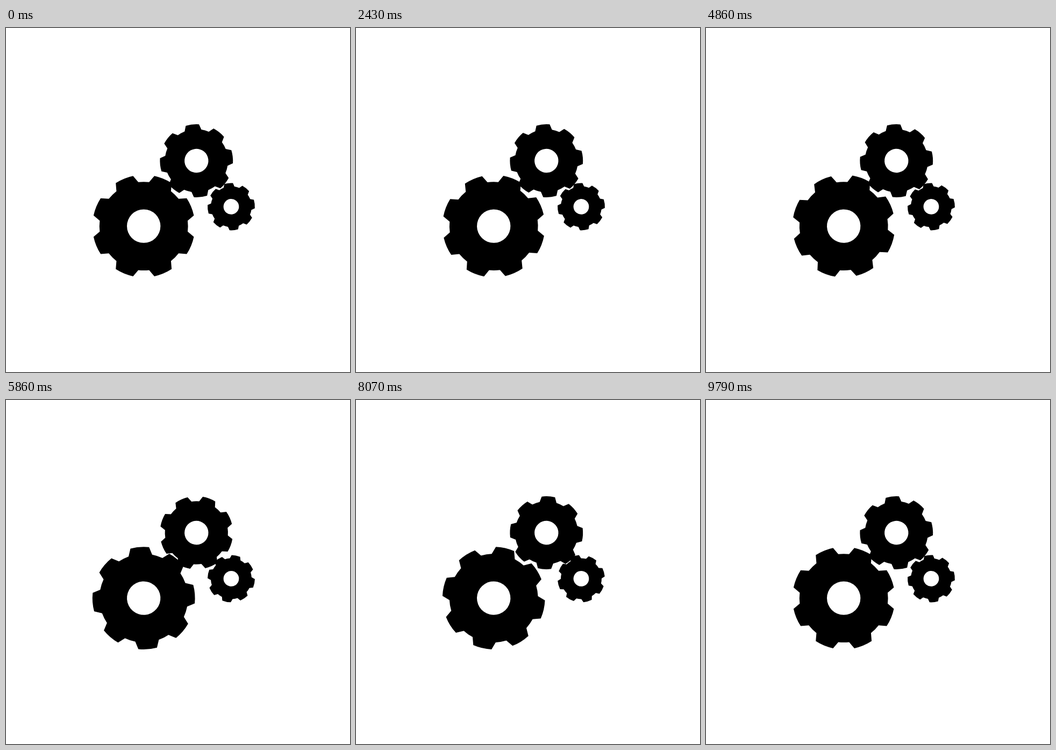
Animation, 640 px wide and 640 px high, one loop 9870 ms. Source, as an HTML page with a canvas:

```html
<!DOCTYPE html>
<html>
<head>
<meta charset="utf-8">
<title>Turning gears</title>
<style>
  html, body { margin: 0; height: 100%; overflow: hidden; background: #fff; }
  canvas { display: block; }
</style>
</head>
<body>
<canvas width="640" height="640"></canvas>
<script>
const ctx = document.querySelector('canvas').getContext('2d');
const LOOP = 9870, LAST_STEP = 137, TURNS = 3;
const rad = deg => deg * Math.PI / 180;

// All gears share one shape: eight tapered teeth around a round hole.
const TEETH = 8, TIP = 95.4, ROOT = 82.4, HOLE = 31.2;
const TIP_HALF = rad(10.5), ROOT_HALF = rad(15.5);

const gears = [
  { x: 256.2, y: 368.6, scale: 1, phase: 22.5, dir: 1 },
  { x: 354.3, y: 247, scale: 0.712, phase: -6.5, dir: -1 },
  { x: 419, y: 332.4, scale: 0.461, phase: -6.4, dir: 1 }
];

const gearPath = new Path2D();
for (let i = 0; i < TEETH; i++) {
  const mid = rad(i * 360 / TEETH), next = rad((i + 1) * 360 / TEETH);
  gearPath.arc(0, 0, TIP, mid - TIP_HALF, mid + TIP_HALF);
  gearPath.arc(0, 0, ROOT, mid + ROOT_HALF, next - ROOT_HALF);
}
gearPath.closePath();
gearPath.moveTo(HOLE, 0);
gearPath.arc(0, 0, HOLE, 0, 2 * Math.PI);

// Motion drawn at 25 fps and shown at 14 fps, with times kept to 10 ms.
function angleAt(ms) {
  const tick = Math.floor(ms / 10) * 10;
  const step = Math.min(LAST_STEP, Math.floor((tick + 5) * 14 / 1000));
  const pose = Math.floor((step + 0.5) * 25 / 14);
  return pose / 245 * TURNS * 360;
}

function draw(now) {
  const angle = angleAt(now % LOOP);
  ctx.clearRect(0, 0, 640, 640);
  for (const { x, y, scale, phase, dir } of gears) {
    ctx.save();
    ctx.translate(x, y);
    ctx.scale(scale, scale);
    ctx.rotate(rad(phase + dir * angle));
    ctx.fill(gearPath, 'evenodd');
    ctx.restore();
  }
}

let start;
function tick(now) {
  start ??= now;
  draw(now - start);
  requestAnimationFrame(tick);
}
draw(0);
requestAnimationFrame(tick);
</script>
</body>
</html>
```
